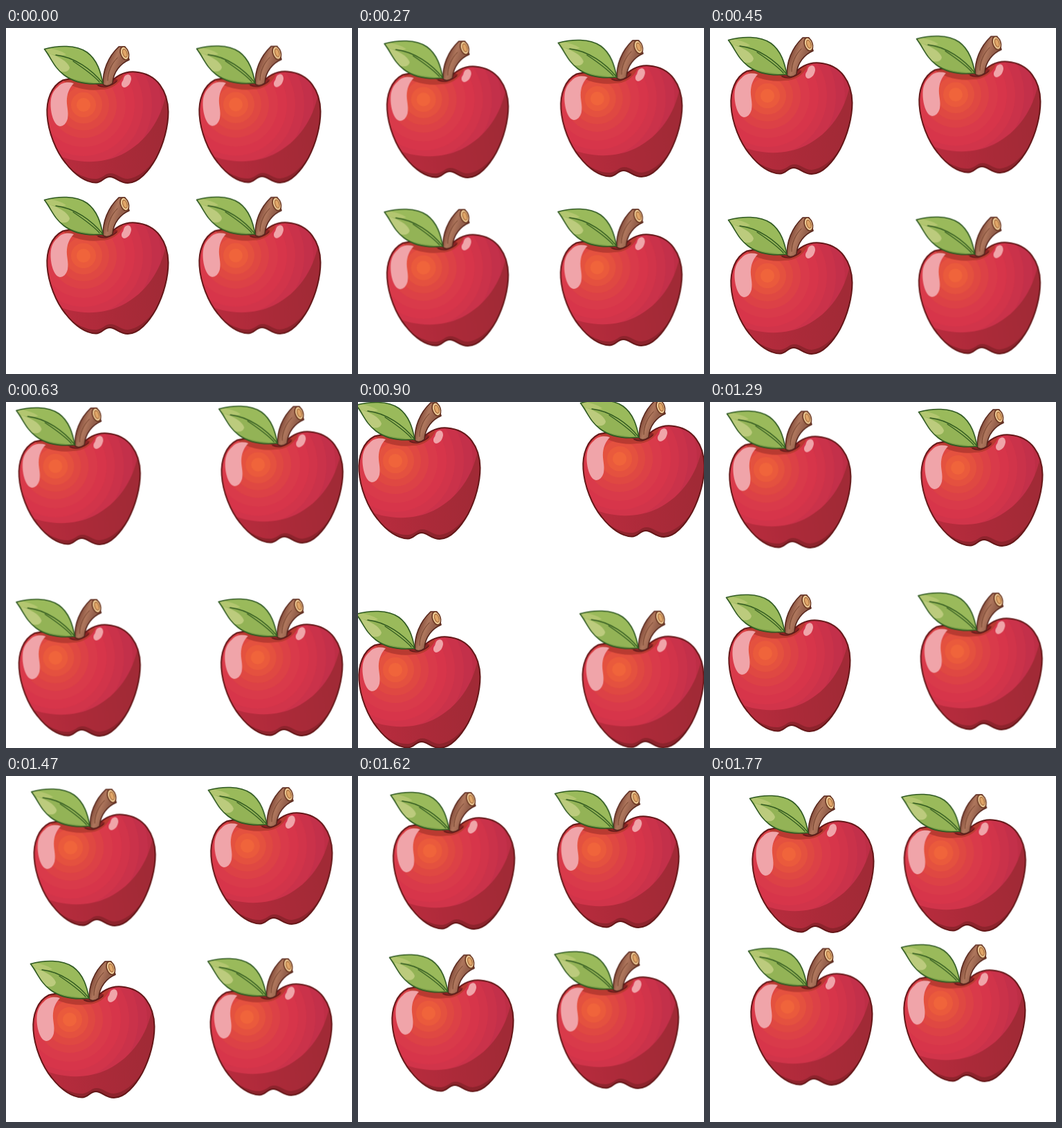
An HTML page that plays this animation: 500x500 px, repeating every 1800 ms.

```html
<!DOCTYPE html>
<html lang="en">
<head>
<meta charset="utf-8">
<title>Four apples</title>
<style>
  html, body { margin: 0; width: 100%; height: 100%; overflow: hidden; background: #fff; }
  svg { display: block; width: 500px; height: 500px; }
  .apple { animation: drift 1800ms infinite; }
  .tl { --from: translate(0px, 0px); --out: translate(-58px, -26px); --back: translate(2px, 2px); }
  .tr { --from: translate(220px, -.5px); --out: translate(266px, -29px); --back: translate(221.5px, 0px); }
  .bl { --from: translate(0px, 218px); --out: translate(-58px, 276px); --back: translate(0px, 222.5px); }
  .br { --from: translate(220px, 217.7px); --out: translate(265.2px, 275.5px); --back: translate(221px, 217.3px); }
  /* One step every 30 ms: 30 outward, 29 back, then a hold. */
  @keyframes drift {
    0% { transform: var(--from); animation-timing-function: steps(30, end); }
    50% { transform: var(--out); animation-timing-function: steps(29, end); }
    98.3333%, 100% { transform: var(--back); }
  }
</style>
</head>
<body>
<svg viewBox="0 0 500 500">
  <defs>
    <linearGradient id="shade" gradientUnits="userSpaceOnUse" x1="75" y1="185" x2="225" y2="150">
      <stop offset="0" stop-color="#b92c3e"/>
      <stop offset=".5" stop-color="#ab2a39"/>
      <stop offset="1" stop-color="#a12a36"/>
    </linearGradient>
    <linearGradient id="bark" gradientUnits="userSpaceOnUse" x1="143" y1="57" x2="162" y2="64">
      <stop offset="0" stop-color="#834c3b"/>
      <stop offset=".5" stop-color="#af775d"/>
      <stop offset="1" stop-color="#94604c"/>
    </linearGradient>
    <path id="body" d="M148 82C130 74 100 70 82 75.500C65 84 58 105 59.500 126C61 150 72 178 86 195C100 213 116 223.500 130 223.500C139 223.500 141 215 150 215C159 215 164 224 176 224C192 224 207 206 217 188C228 167 234.500 142 234.500 121C234 92 219 66 187 63.500C170 62 157 71 148 82Z"/>
    <path id="leafShape" d="M55.500 30.500C75 25 101 24 117 35C132 46 137 64 140 80C122 82 100 80 84 68C70 58 65 43 55.500 30.500Z"/>
    <clipPath id="inBody"><use href="#body"/></clipPath>
    <clipPath id="inLeaf"><use href="#leafShape"/></clipPath>

    <g id="apple" stroke-linecap="round" stroke-linejoin="round">
      <g clip-path="url(#inBody)">
        <path d="M50 55H245V235H50Z" fill="#bd2e46"/>
        <g transform="translate(112 111)">
          <circle r="112" fill="#c3304a"/>
          <circle r="99" fill="#ca324a"/>
          <circle r="86" fill="#d1344a"/>
          <circle r="74" fill="#d7354a"/>
          <circle r="61" fill="#d93a4a"/>
          <circle r="48" fill="#dc4146"/>
          <circle r="37" fill="#df4842"/>
          <circle r="27" fill="#e4513f"/>
          <circle r="18" fill="#ea5a3c"/>
          <circle r="10" fill="#f0643b"/>
        </g>
        <path d="M66 180C98 197 138 197 167 183C203 165 224 132 231 96L245 90V235H60Z" fill="url(#shade)"/>
        <path d="M84 197C104 213 119 219 131 218C140 217 143 210 151 210C160 210 166 218 176 218C190 217 204 205 216 189L222 235H84Z" fill="#86222a" opacity=".8"/>
        <path d="M78 72C92 86 118 92 137 89C152 89 163 82 170 68L145 60Z" fill="#b93a31"/>
        <path d="M128 80C136 87 152 87 162 75L148 70Z" fill="#8b2424"/>
      </g>
      <use href="#body" fill="none" stroke="#641718" stroke-width="2"/>
      <g fill="#f0a4a9">
        <path d="M75 85C80 79 89 77 98 80C92 86 89 93 88 102C87 112 91 120 89 131C87 138 83 142 78 142C69 141 64 122 64.500 108C65 98 68 91 75 85Z"/>
        <path d="M172 69C177 65 181 68 181 74C180 80 177 85 171 86C166 85 166 79 169 76C170 74 170 71 172 69Z"/>
      </g>

      <path d="M140.500 82C139 63 147 42 163 27L172 27L178 46C166 51 155 63 154 80C149 84 144 84 140.500 82Z" fill="url(#bark)" stroke="#55251b" stroke-width="1.600"/>
      <path d="M147 76C147 64 152 52 161 43" fill="none" stroke="#74442f" stroke-width="1"/>
      <g transform="rotate(-18 171.500 37)" stroke="#6b3722">
        <ellipse cx="171.500" cy="36.500" rx="5.800" ry="9.800" fill="#f0cd98" stroke-width="1.600"/>
        <ellipse cx="172" cy="36.500" rx="3" ry="6" fill="#e0a668" stroke="#a4683a" stroke-width="1.200"/>
      </g>
      <path d="M133 83C141 87 151 85 160 77" fill="none" stroke="#621b1b" stroke-width="1.400"/>

      <use href="#leafShape" fill="#9aba5b"/>
      <g clip-path="url(#inLeaf)">
        <path d="M55 30C72 38 100 42 140 80L126 90L78 74Z" fill="#93b356"/>
        <path d="M55 30C66 28 78 32 87 38C82 41 72 40 62 37Z" fill="#b3c670"/>
        <path d="M62 37C76 41 89 48 92 57C91 64 82 65 76 61C70 56 67 48 62 37Z" fill="#bccb7d"/>
        <path d="M79 66C99 77 119 78 140 80L122 86L90 81Z" fill="#7c9f48"/>
      </g>
      <path d="M72 39C99 42 124 60 140 80M97 48C112 58 126 68 135 78" fill="none" stroke="#30591f" stroke-width="1.300"/>
      <use href="#leafShape" fill="none" stroke="#2f5922" stroke-width="1.600"/>
    </g>
  </defs>
  <use class="apple tl" href="#apple"/>
  <use class="apple tr" href="#apple"/>
  <use class="apple bl" href="#apple"/>
  <use class="apple br" href="#apple"/>
</svg>
</body>
</html>
```
